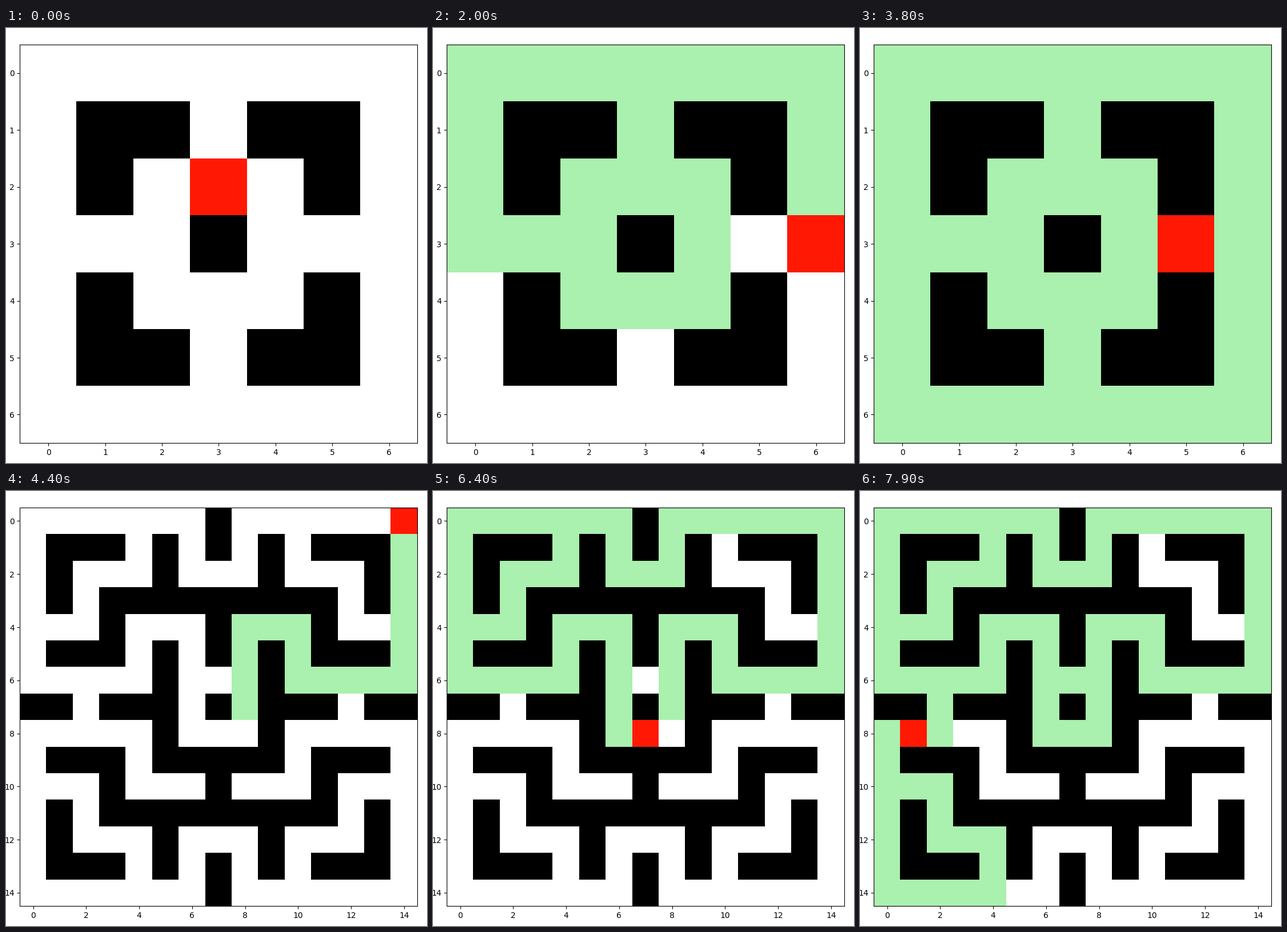
These frames come from a looping animation (737x760 px, 8000 ms). A matplotlib script:

```python
import numpy as np
import matplotlib.pyplot as plt
from matplotlib.animation import FuncAnimation

W, H, DPI = 737, 760, 100
FRAMES, INTERVAL = 80, 100
SWITCH = 39  # first frame of the large maze

FREE, WALL, SEEN, HEAD = range(4)
COLORS = np.array([(255, 255, 255), (0, 0, 0), (170, 240, 174), (255, 25, 4)],
                  dtype=np.uint8)
MOVES = {"U": (-1, 0), "D": (1, 0), "L": (0, -1), "R": (0, 1)}

# Left halves including the middle column; the right side is mirrored.
SMALL = ".... .##. .#.. ...# .#.. .##. ...."
LARGE = (".......# .###.#.# .#...#.. .#.##### ...#...# .###.#.# .....#.. "
         "##.###.# .....#.. .###.### ...#...# .#.##### .#...#.. .###.#.# "
         ".......#")

SMALL_ROUTE = ("U2 L3 D3 R2 D1 R2 U2 L2 R1 U2 R3 D6 L6 "
               "U3 R2 D1 R1 D1 U1 R1 U1 R1")
LARGE_ROUTE = ("U3 R2 D2 R4 U6 L6 D2 L2 U2 L6 D4 R2 U2 R2 U1 D1 L2 D2 L2 "
               "D2 R4 U2 R2 D4 R2 U2 L2 U2 L2 D2 L2 D2 L2 D2 R2 D2 R2 D2 "
               "L4 U6 R1")


def build(half):
    return np.array([[WALL if c == "#" else FREE for c in row + row[-2::-1]]
                     for row in half.split()])


def walk(start, route):
    path = [start]
    for leg in route.split():
        dr, dc = MOVES[leg[0]]
        for _ in range(int(leg[1:])):
            r, c = path[-1]
            path.append((r + dr, c + dc))
    return path


# grid, path, tick spacing, steps per second, step offset
STAGES = [
    (build(SMALL), walk((2, 3), SMALL_ROUTE), 1, 12.9, 0.25),
    (build(LARGE), walk((7, 8), LARGE_ROUTE), 2, 25.4, 40.4 - 25.4 * 5.3),
]

fig = plt.figure(figsize=(W / DPI, H / DPI), dpi=DPI, facecolor="white")
LEFT, TOP, SIDE = 24.4, 29.3, 695.8
ax = fig.add_axes([LEFT / W, 1 - (TOP + SIDE) / H, SIDE / W, SIDE / H])
plt.rcParams["font.family"] = "DejaVu Sans"
image = ax.imshow(COLORS[STAGES[0][0]], aspect="auto", interpolation="nearest")


def update(i):
    grid, path, gap, rate, offset = STAGES[i >= SWITCH]
    step = min(int(rate * i * INTERVAL / 1000 + offset), len(path) - 1)

    cells = grid.copy()
    for cell in path[:step]:
        cells[cell] = SEEN
    cells[path[step]] = HEAD

    n = len(grid)
    image.set_data(COLORS[cells])
    image.set_extent((-0.5, n - 0.5, n - 0.5, -0.5))
    ax.set_xlim(-0.5, n - 0.5)
    ax.set_ylim(n - 0.5, -0.5)
    ax.set_xticks(range(0, n, gap))
    ax.set_yticks(range(0, n, gap))
    return [image]


anim = FuncAnimation(fig, update, frames=FRAMES, interval=INTERVAL,
                     repeat=True, repeat_delay=0, blit=False)
plt.show()
```
